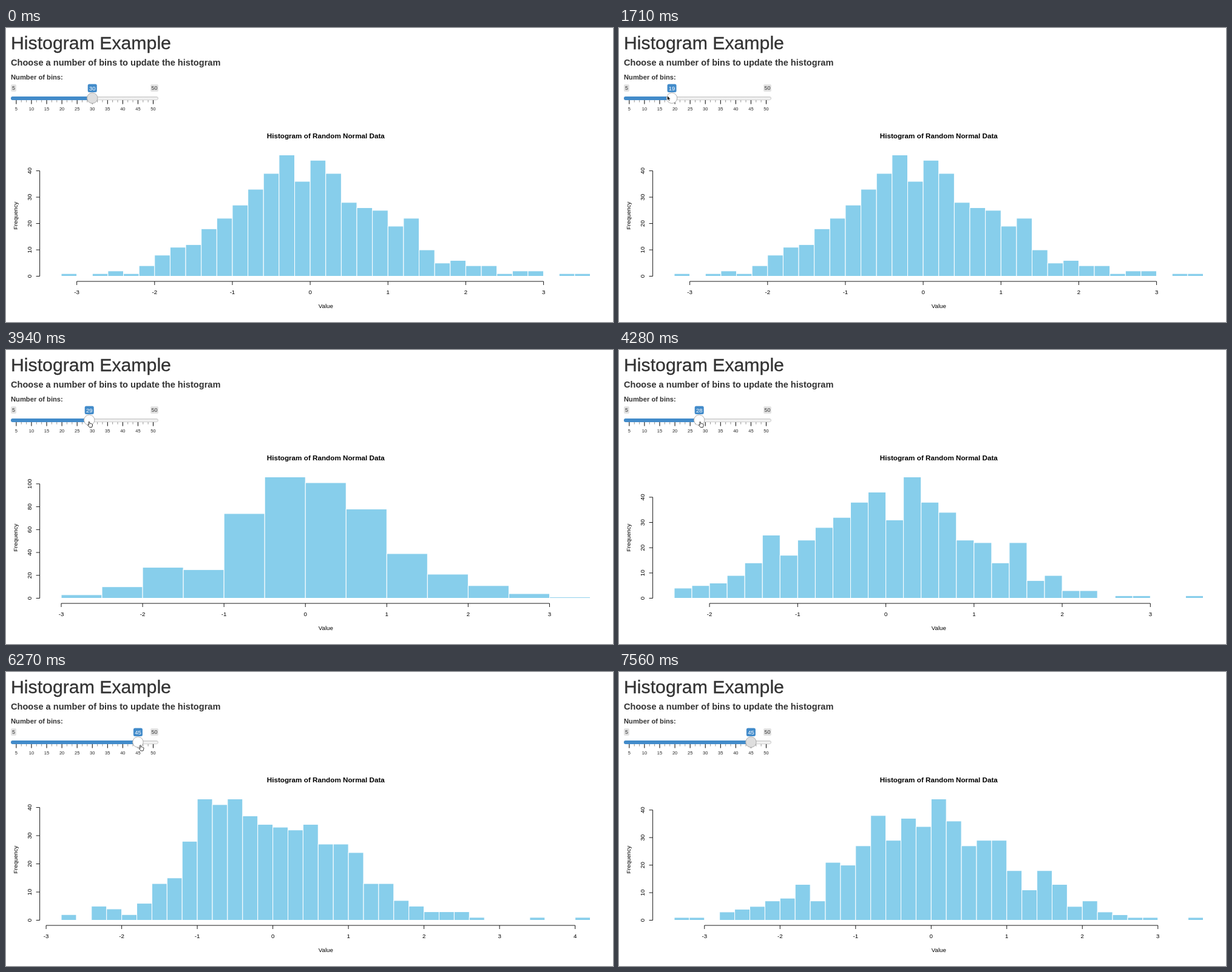
Animation of 1000x485 px, one loop 8.21 s. Source, as an HTML page:

```html
<!DOCTYPE html>
<html lang="en">
<head>
<meta charset="utf-8">
<title>Histogram Example</title>
<style>
  html, body { margin: 0; width: 100%; height: 100%; overflow: hidden; background: #fff; }
  svg { display: block; width: 100%; height: 100%; font-family: "Liberation Sans", Arial, sans-serif; }
  .heading { fill: #333; }
  .bold { font-weight: bold; }
  .mid { text-anchor: middle; }
  .plot text { font-size: 9.7px; text-anchor: middle; }
  .plot path { fill: none; stroke: #000; stroke-width: .9; }
  .bar { fill: #87ceeb; stroke: #fff; }
  .badge { fill: #e3e3e3; }
  .small { font-size: 9px; fill: #333; text-anchor: middle; }
  .tick { font-size: 7.5px; fill: #222; text-anchor: middle; }
</style>
</head>
<body>
<svg viewBox="0 0 1000 485">
  <g class="heading">
    <text x="8" y="35" font-size="30.25" stroke="#333" stroke-width=".3">Histogram Example</text>
    <text class="bold" x="8" y="62" font-size="14.6">Choose a number of bins to update the histogram</text>
    <text class="bold" x="8" y="85" font-size="11.2">Number of bins:</text>
  </g>
  <g>
    <rect class="badge" x="8" y="93" width="9" height="12" rx="2"/>
    <text class="small" x="12.5" y="102">5</text>
    <rect class="badge" x="238" y="93" width="13" height="12" rx="2"/>
    <text class="small" x="244.4" y="102">50</text>
    <defs>
      <linearGradient id="groove" x2="0" y2="1">
        <stop stop-color="#dedede"/><stop offset="1" stop-color="#fff"/>
      </linearGradient>
    </defs>
    <g id="scale"></g>
    <rect x="8.5" y="113.5" width="242" height="5" rx="2.5" fill="url(#groove)" stroke="#ccc"/>
    <rect id="filled" x="8" y="113" height="6" rx="3" fill="#428bca"/>
    <g id="knob">
      <rect x="-7.5" y="92.5" width="15" height="13.5" rx="2.5" fill="#428bca"/>
      <text id="count" class="mid" y="102.5" font-size="9.5" fill="#fff"></text>
      <circle id="handle" cy="115.6" r="8.7" stroke="#ababab"/>
    </g>
  </g>
  <g class="plot">
    <text class="bold" x="526.8" y="181.5" style="font-size:11.7px">Histogram of Random Normal Data</text>
    <text x="526.8" y="462.3">Value</text>
    <text transform="translate(18.5 309.5) rotate(-90)">Frequency</text>
    <g id="chart"></g>
  </g>
  <g id="cursor">
    <path id="arrow" d="M.5 .5V8.3L2.2 6.8L3.4 9.3L4.8 8.6L3.7 6.3H6Z" fill="#000" stroke="#fff" stroke-width=".7"/>
    <path id="hand" d="M2 1.2Q2.8 0 3.6 1.2L4.1 3.8Q5.2 3.2 5.8 4Q7 3.6 7.3 4.5Q8.5 4.4 8.5 5.6L8 8.4L7.5 10H3.6L.8 6.5Q.4 5.4 1.4 5.4L2.6 6.2Z" fill="#fff" stroke="#222" stroke-width=".9"/>
  </g>
</svg>
<script>
const LOOP = 8210;
const LEFT = 91, WIDTH = 871.5, BASE = 409.5, HEIGHT = 200;

const charts = [
  { at: 0, min: -3.2, max: 3.6, counts: [1,0,1,2,1,4,8,11,12,18,22,27,33,39,46,36,44,39,28,26,25,19,22,10,5,6,4,4,1,2,2,0,1,1] },
  { at: 2450, min: -3, max: 3.5, counts: [3,10,27,25,74,106,101,78,39,21,11,4,1] },
  { at: 4150, min: -2.4, max: 3.6, counts: [4,5,6,9,14,25,17,23,28,32,38,42,31,48,38,34,23,22,14,22,7,9,3,3,0,1,1,0,0,1] },
  { at: 5300, min: -2.8, max: 4.2, counts: [2,0,5,4,2,6,13,15,28,43,41,43,37,34,33,32,34,27,27,24,13,13,7,5,3,3,3,1,0,0,0,1,0,0,1] },
  { at: 6670, min: -3.4, max: 3.6, counts: [1,1,0,3,4,5,7,8,13,7,21,20,27,38,29,37,34,44,36,27,29,29,18,11,18,13,5,7,3,2,1,1,0,0,1] }
];

// time, slider value
const drag = [
  [0, 30], [1170, 30], [1710, 19], [1940, 15], [3230, 15], [3780, 29], [4200, 29],
  [4450, 27], [4640, 27], [4930, 41], [5950, 41], [6270, 45]
];

// time, pointer x, pointer y
const pointer = [
  [100, 560, 440], [480, 260, 200], [620, 200, 150], [1000, 136, 111], [1170, 136, 111],
  [1710, 79, 111], [1940, 60, 114], [2990, 60, 114], [3150, 63, 116], [3230, 63, 117],
  [3780, 134, 117.5], [4200, 134, 117.5], [4450, 124, 118], [4640, 124, 118],
  [4930, 195, 118], [5090, 196.5, 119], [5950, 196.5, 119], [6270, 218.5, 120],
  [7000, 218.5, 120], [7160, 508, 420], [7240, 450, 477], [7450, 452, 478]
];

const $ = id => document.getElementById(id);

function sample(track, t) {
  const next = track.findIndex(key => key[0] > t);
  if (next < 0) return track[track.length - 1].slice(1);
  if (next === 0) return track[0].slice(1);
  const a = track[next - 1], b = track[next];
  const k = (t - a[0]) / (b[0] - a[0]);
  return a.slice(1).map((v, i) => v + (b[i + 1] - v) * k);
}

const sliderX = value => 16.9 + (value - 5) * 5.013;

function scaleMarkup() {
  let out = "";
  for (let i = 0; i <= 27; i++) {
    const major = i % 3 === 0, value = 5 + i * 5 / 3, x = sliderX(value);
    out += `<path d="M${x} 119V${major ? 125.5 : 122.5}" stroke="${major ? "#000" : "#777"}" stroke-width="${major ? 1 : .8}"/>`;
    if (major) out += `<text class="tick" x="${x}" y="136">${Math.round(value)}</text>`;
  }
  return out;
}

function chartMarkup({ min, max, counts }) {
  const peak = Math.max(...counts), range = max - min;
  const x = v => LEFT + (v - min) / range * WIDTH;
  const y = n => BASE - n / peak * HEIGHT;
  const binWidth = WIDTH / counts.length;
  let out = "", axes = "";

  counts.forEach((n, i) => {
    if (n) out += `<rect class="bar" x="${LEFT + i * binWidth}" y="${y(n)}" width="${binWidth}" height="${BASE - y(n)}"/>`;
  });

  const first = Math.ceil(min - range * .04), last = Math.floor(max + range * .04);
  axes += `M${x(first)} 418H${x(last)}`;
  for (let v = first; v <= last; v++) {
    axes += `M${x(v)} 418V424`;
    out += `<text x="${x(v)}" y="439">${v}</text>`;
  }

  const step = peak > 50 ? 20 : 10, top = Math.floor(peak / step) * step;
  axes += `M55.6 ${BASE}V${y(top)}`;
  for (let n = 0; n <= top; n += step) {
    axes += `M55.6 ${y(n)}H49.6`;
    out += `<text transform="translate(41.7 ${y(n)}) rotate(-90)">${n}</text>`;
  }
  return out + `<path d="${axes}"/>`;
}

let shown;

function render(now) {
  const t = now % LOOP;

  const chart = charts.filter(c => c.at <= t).pop();
  if (chart !== shown) {
    $("chart").innerHTML = chartMarkup(chart);
    shown = chart;
  }

  const value = Math.round(sample(drag, t)[0]), handleX = sliderX(value);
  $("filled").setAttribute("width", handleX - 8);
  $("knob").setAttribute("transform", `translate(${handleX} 0)`);
  $("count").textContent = value;
  $("handle").setAttribute("fill", t > 900 && t < 7080 ? "#fff" : "#dedede");

  const [px, py] = sample(pointer, t);
  const hand = t >= 1940 && t < 7080;
  $("cursor").setAttribute("transform", `translate(${px} ${py})`);
  $("cursor").style.display = t >= 100 && t < 7560 ? "" : "none";
  $("hand").style.display = hand ? "" : "none";
  $("arrow").style.display = hand ? "none" : "";
}

$("scale").innerHTML = scaleMarkup();
const start = performance.now();
function tick() {
  render(performance.now() - start);
  requestAnimationFrame(tick);
}
tick();
</script>
</body>
</html>
```
